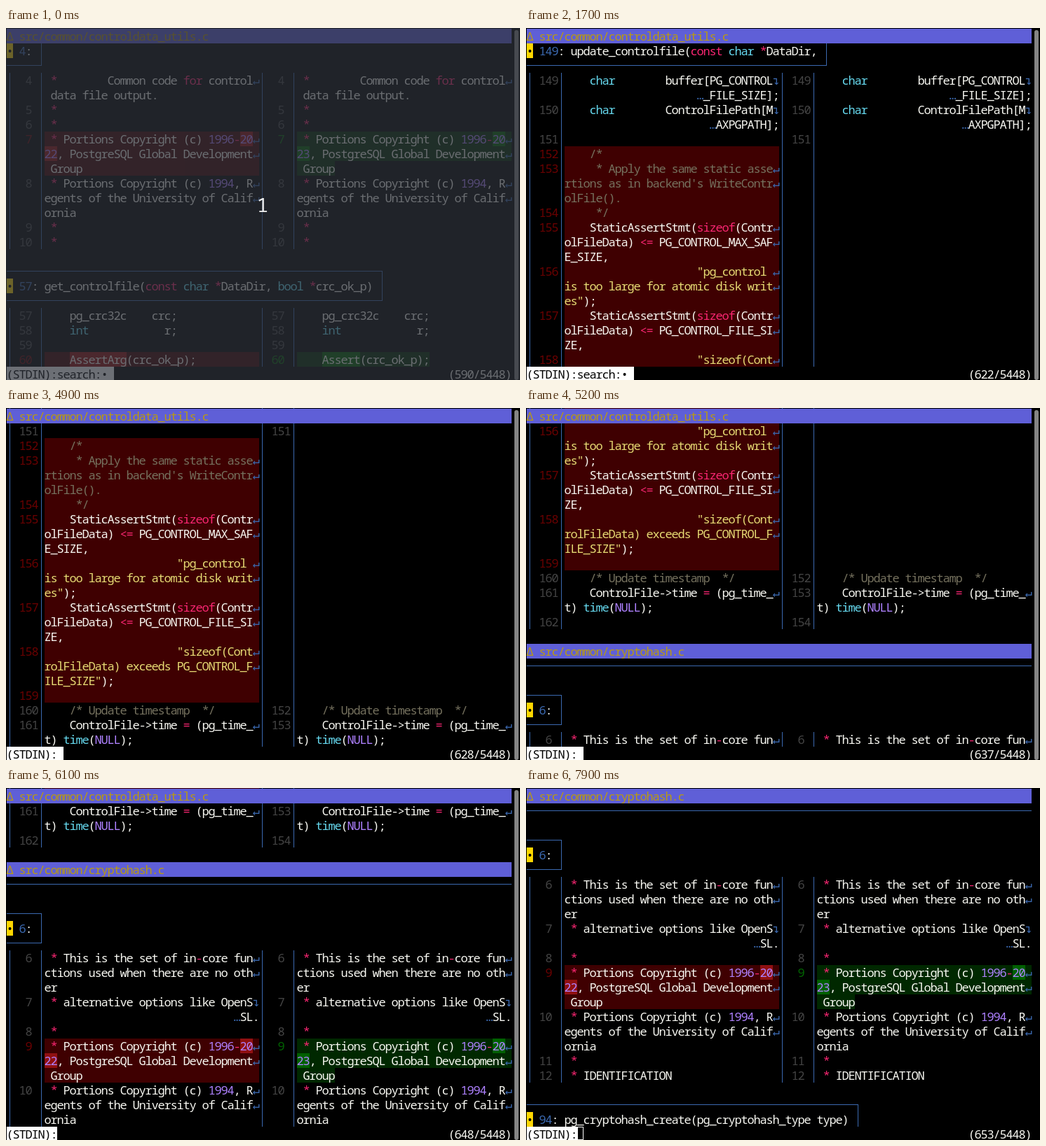
Write an HTML page that moves like this. It is 733 by 503 pixels and loops after 8.1 s.

```html
<!DOCTYPE html>
<html lang="en">
<head>
<meta charset="utf-8">
<title>Side-by-side diff in a pager</title>
<style>
@property --pos { syntax: '<integer>'; inherits: true; initial-value: 590; }

html, body { margin: 0; width: 100%; height: 100%; overflow: hidden; background: #000; }
#stage {
  --blue: #3b69b0;
  position: relative; width: 733px; height: 503px; overflow: hidden;
  background: #000; color: #f8f8f2;
  font: 17px/21px 'Noto Sans Mono', 'DejaVu Sans Mono', monospace;
  font-variant-ligatures: none;
  /* one glyph per 9px terminal cell, centred */
  letter-spacing: calc(9px - 1ch);
  text-indent: calc((9px - 1ch) / 2);
  animation: scroll 8.1s step-end infinite;
}
#stage div, #stage span { position: absolute; white-space: pre; }
#stage .row { left: 0; width: 720px; height: 21px; }
#stage span { top: 0; height: 21px; }

#lines { left: 1px; top: 1px; transform: translateY(calc((590 - var(--pos)) * 21px)); }
.file { background: #5f5fd7; color: #b99a12; }
#stage #sticky { left: 1px; top: 1px; animation: sticky 8.1s step-end infinite; }
.rule { border-top: 1px solid var(--blue); left: 0; top: 10px; width: 720px; }
.box { left: 0; top: 10px; height: 41px; border: 1px solid var(--blue); border-left: 0; }
.mark { background: #ffd700; color: #000; }

.panel { top: 0; width: 360px; height: 21px; }
.panel::before, .panel::after {
  content: ''; position: absolute; left: 4px; width: 1px; height: 21px; background: var(--blue);
}
.panel::after { left: 49px; }
.fill { left: 54px; height: 21px; }
.num { color: #444; }
.minus .num { color: #6a0000; }
.plus .num { color: #006400; }
.minus .fill { background: #3f0001; }
.plus .fill { background: #002800; }
.minus :is(.E, .P, .N) { background: #901011; }
.plus :is(.E, .P, .N) { background: #006000; }
.b { color: var(--blue); }
.p, .P { color: #f92672; }
.t { color: #66d9ef; }
.n, .N { color: #ae81ff; }
.s { color: #e6db74; }
.c { color: #75715e; }

#status { left: 0; top: 484px; width: 722px; height: 21px; background: #000; }
#status div { top: 0; }
.prompt { left: 1px; background: #fff; color: #000; }
#search { width: 144px; animation: search 8.1s step-end infinite; }
#plain { width: 72px; }
#count { left: 631px; counter-reset: pos var(--pos); }
#count::before { content: '(' counter(pos) '/5448)'; }
#cursor {
  width: 9px; height: 19px;
  animation: move 8.1s step-end infinite, blink 8.1s step-end infinite;
}
#bar {
  left: 725px; top: 3px; width: 6px; height: 500px; border-radius: 3px; background: #858585;
  animation: bar 8.1s step-end infinite;
}
#dim { inset: 0; background: rgba(46, 51, 59, .7); animation: intro 8.1s step-end infinite; }
#dim b {
  position: absolute; left: 346px; top: 232px; width: 40px; text-align: center; text-indent: 0;
  font-size: 28px; font-weight: 400; line-height: 40px; letter-spacing: 0; color: #eee;
}

@keyframes scroll {
  0% { --pos: 590; }
  8.641% { --pos: 606; }
  20.987% { --pos: 622; }
  53.086% { --pos: 623; }
  59.259% { --pos: 625; }
  60.493% { --pos: 628; }
  61.728% { --pos: 631; }
  62.962% { --pos: 634; }
  64.197% { --pos: 637; }
  65.432% { --pos: 641; }
  66.666% { --pos: 645; }
  67.901% { --pos: 648; }
  82.716%, 100% { --pos: 653; }
}
@keyframes sticky { 0% { opacity: 1; } 82.716%, 100% { opacity: 0; } }
@keyframes search { 0% { opacity: 1; } 53.086%, 100% { opacity: 0; } }
@keyframes move { 0% { left: 145px; } 53.086%, 100% { left: 73px; } }
@keyframes blink {
  0%, 8.641%, 20.987%, 35.802%, 50.617%, 82.716% { background: #fff; box-shadow: none; }
  4.938%, 16.049%, 28.395%, 43.209%, 75.308%, 90.123% { background: #000; box-shadow: none; }
  97.53%, 100% { background: #000; box-shadow: inset 0 0 0 1px #fff; }
}
@keyframes bar { 0% { opacity: 1; } 97.53%, 100% { opacity: 0; } }
@keyframes intro { 0% { opacity: 1; } 1.234%, 100% { opacity: 0; } }
</style>
</head>
<body>
<div id="stage">
  <div id="lines"></div>
  <div id="sticky" class="row file">Δ src/common/controldata_utils.c</div>
  <div id="status">
    <div id="plain" class="prompt">(STDIN):</div>
    <div id="search" class="prompt">(STDIN):search:•</div>
    <div id="cursor"></div>
    <div id="count"></div>
  </div>
  <div id="bar"></div>
  <div id="dim"><b>1</b></div>
</div>
<script>
const CELL = 9, LINE = 21, FIRST = 6, WIDTH = 34;
const lines = document.getElementById('lines');
let count = 0;

function add(parent, tag, cls, text = '', style = {}) {
  const el = document.createElement(tag);
  el.className = cls;
  el.textContent = text;
  Object.assign(el.style, style);
  return parent.appendChild(el);
}

const row = (cls = '', text = '') =>
  add(lines, 'div', 'row ' + cls, text, { top: count++ * LINE + 'px' });

const put = (parent, col, text, cls = '') =>
  add(parent, 'span', cls, text, { left: col * CELL + 'px', width: text.length * CELL + 'px' });

const size = s => s.replace(/«.|»/g, '').length;

// Markup: «xtext» gives text the class x.
function write(parent, col, s) {
  const parts = s.split(/«(.)(.*?)»/);
  parts.forEach((part, i) => {
    if (i % 3 === 1 || !part) return;
    put(parent, col, part, i % 3 === 2 ? parts[i - 1] : '');
    col += part.length;
  });
}

function panel(parent, x, num, rows, i, kind) {
  const el = add(parent, 'div', 'panel ' + kind, '', { left: x + 'px' });
  if (!rows) return;
  const s = rows[i], next = rows[i + 1], wraps = next !== undefined;
  const cells = kind === 'plus' && !wraps ? size(s) : WIDTH;
  if (kind) add(el, 'div', 'fill', '', { width: cells * CELL + 'px' });
  if (i === 0) {
    const digits = String(num);
    put(el, 1 + Math.ceil((4 - digits.length) / 2), digits, 'num');
  }
  if (s[0] === '…') {
    const col = FIRST + WIDTH - size(s);
    put(el, col, '…', 'b');
    write(el, col + 1, s.slice(1));
  } else {
    write(el, FIRST, s);
  }
  if (wraps) put(el, FIRST + WIDTH - 1, next[0] === '…' ? '↴' : '↵', 'b');
}

function pair(l, left, r, right, kinds = ['', '']) {
  left.forEach((_, i) => {
    const el = row();
    panel(el, 0, l, left, i, kinds[0]);
    panel(el, 360, r, right, i, kinds[1]);
  });
}
const same = (l, rows, r = l) => pair(l, rows, r, rows);
const changed = (n, left, right) => pair(n, left, n, right, ['minus', 'plus']);
const removed = (n, ...rows) => pair(n, rows, 0, null, ['minus', '']);

function heading(num, code = '') {
  const digits = String(num);
  const end = digits.length + 4 + (code ? size(code) + 1 : 0);
  add(row(), 'div', 'box', '', { width: end * CELL + 4 + 'px' });
  const el = row();
  put(el, 0, '•', 'mark');
  write(el, 2, `«b${digits}»: ${code}`);
  row();
}

function copyright(n) {
  const rows = year => [
    ' «p*» Portions Copyright (c) «n1996»«p-»«N20»',
    `«N${year}», PostgreSQL Global Development`,
    ' Group'];
  changed(n, rows(22), rows(23));
  same(n + 1, [
    ' «p*» Portions Copyright (c) «n1994», R',
    'egents of the University of Calif',
    'ornia']);
}

const star = ' «p*»';
const gap = n => ' '.repeat(n);

heading(4);
same(4, [star + gap(8) + 'Common code «pfor» control', ' data file output.']);
same(5, [star]);
same(6, [star]);
copyright(7);
same(9, [star]);
same(10, [star]);
row();

heading(57, 'get_controlfile(«pconst» «tchar» «p*»DataDir, «tbool» «p*»crc_ok_p)');
same(57, ['    pg_crc32c    crc;']);
same(58, ['    «tint»            r;']);
same(59, ['']);
changed(60, ['    «EAssertArg»(crc_ok_p);'], ['    «EAssert»(crc_ok_p);']);
same(61, ['']);
changed(62,
  ['    ControlFile «p=» «Epalloc(»«Psizeof»(C', 'ontrolFileData)«E)»;'],
  ['    ControlFile «p=» «Epalloc_object»(C', 'ontrolFileData);']);
same(63, [
  '    snprintf(ControlFilePath, MAX',
  'PGPATH, «s"»«n%s»«s/global/pg_control"», D',
  'ataDir);']);
same(64, ['']);
same(65, ['«p#ifndef» «nFRONTEND»']);
row();

heading(149, 'update_controlfile(«pconst» «tchar» «p*»DataDir,');
same(149, ['    «tchar»' + gap(8) + 'buffer[PG_CONTROL', '…_FILE_SIZE];']);
same(150, ['    «tchar»' + gap(8) + 'ControlFilePath[M', '…AXPGPATH];']);
same(151, ['']);
removed(152, '    «c/*»');
removed(153,
  '     «c* Apply the same static asse»',
  "«crtions as in backend's WriteContr»",
  '«colFile().»');
removed(154, '     «c*/»');
const check = '    StaticAssertStmt(«psizeof»(Contr';
removed(155, check, 'olFileData) «p<=» PG_CONTROL_MAX_SAF', 'E_SIZE,');
removed(156, gap(21) + '«s"pg_control »', '«sis too large for atomic disk writ»', '«ses"»);');
removed(157, check, 'olFileData) «p<=» PG_CONTROL_FILE_SI', 'ZE,');
removed(158, gap(21) + '«s"sizeof(Cont»', '«srolFileData) exceeds PG_CONTROL_F»', '«sILE_SIZE"»);');
removed(159, '');
same(160, ['    «c/* Update timestamp  */»'], 152);
same(161, ['    ControlFile->time «p=» (pg_time_', 't) «ttime»(«nNULL»);'], 153);
same(162, [''], 154);
row();

row('file', 'Δ src/common/cryptohash.c');
add(row(), 'div', 'rule');
row();
heading(6);
same(6, [
  star + ' This is the set of in«p-»core fun',
  'ctions used when there are no oth',
  'er']);
same(7, [star + ' alternative options like OpenS', '…SL.']);
same(8, [star]);
copyright(9);
same(11, [star]);
same(12, [star + ' IDENTIFICATION']);
row();
heading(94, 'pg_cryptohash_create(pg_cryptohash_type type)');
</script>
</body>
</html>
```
